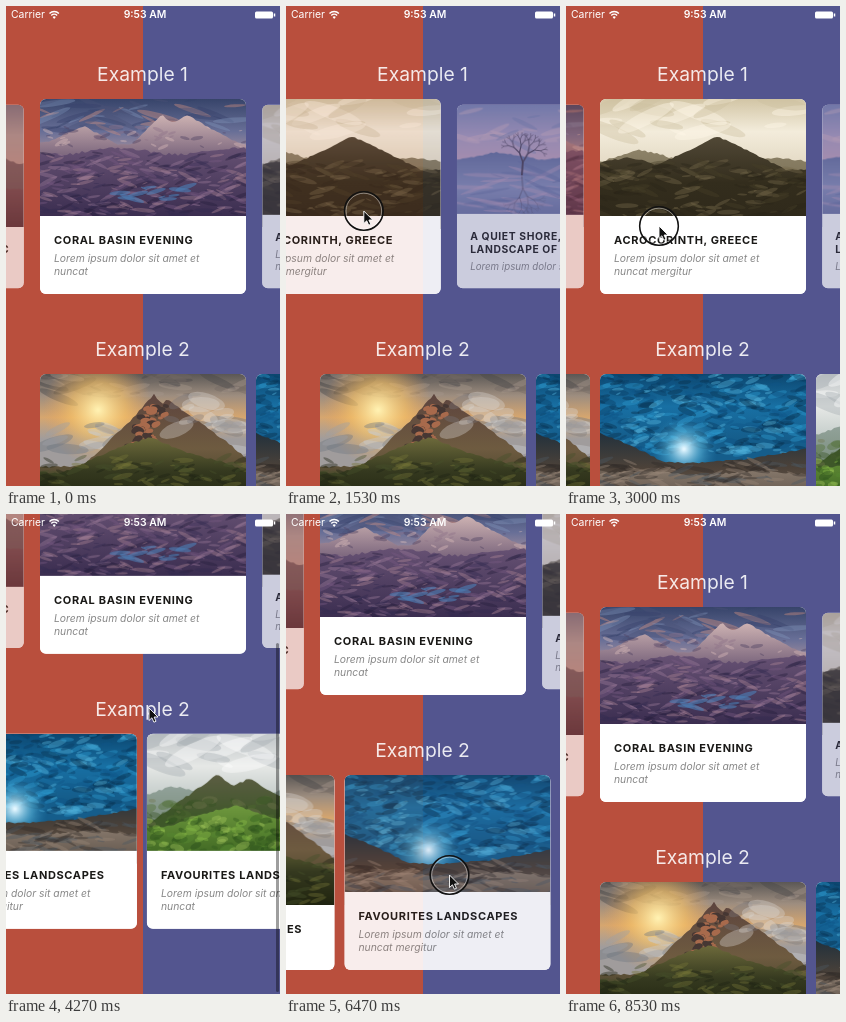
These frames come from a looping animation (274x480 px, 8590 ms). An HTML page with a canvas:

```html
<!DOCTYPE html>
<html lang="en">
<head>
<meta charset="utf-8">
<style>
html, body { margin: 0; width: 100%; height: 100%; overflow: hidden; }
body { font-family: Inter, Roboto, sans-serif; }
#stage { position: absolute; left: 0; top: 0; width: 274px; height: 480px; overflow: hidden; background: linear-gradient(90deg, #b94f3d 136.5px, #53558f 137.5px); }
#page { position: absolute; width: 274px; height: 587px; }
h2 { position: absolute; width: 273px; margin: 0; text-align: center; font-weight: 400; font-size: 19.3px; line-height: 24px; color: rgba(255,255,255,.88); }
.card { position: absolute; left: 34px; width: 206px; height: 195px; border-radius: 6px; overflow: hidden; background: #fff; }
.card canvas { position: absolute; left: 0; top: 0; }
.text { position: absolute; left: 0; right: 0; bottom: 0; padding: 17px 14px 16px; background: #fff; white-space: nowrap; }
.text b { display: block; font-size: 11px; line-height: 14px; letter-spacing: .64px; color: #1a1917; }
.text i { display: block; margin-top: 5px; font-size: 10.35px; line-height: 13px; color: #888; }
#bar { position: absolute; right: 1.5px; width: 2.5px; border-radius: 2px; background: rgba(0,0,0,.38); }
.status { position: absolute; top: 3px; color: #fff; font-size: 10.4px; line-height: 12px; white-space: nowrap; }
svg { position: absolute; left: 0; top: 0; overflow: visible; }
</style>
</head>
<body>
<div id="stage">
  <div id="page">
    <h2 style="top:56px">Example 1</h2>
    <h2 style="top:331px">Example 2</h2>
  </div>
  <div id="bar"></div>
  <div class="status" style="left:5px">Carrier</div>
  <div class="status" style="left:0;width:278px;text-align:center;font-weight:600">9:53 AM</div>
  <svg width="274" height="20" fill="none" stroke="#fff">
    <path d="M43.5 7.5a6.5 6.5 0 0 1 9.4 0M45.3 9.4a4 4 0 0 1 5.8 0" stroke-width="1.4"/>
    <path d="M46.6 11a2.2 2.2 0 0 1 3.2 0l-1.6 1.9z" fill="#fff" stroke="none"/>
    <rect x="249" y="5.5" width="18" height="7" rx="1.5" fill="#fff" stroke="none"/>
    <path d="M268.5 7.5v3" stroke-width="1.5"/>
  </svg>
  <svg id="cursor" width="1" height="1">
    <g id="ring" fill="none">
      <circle r="19.3" stroke="#111" stroke-width="1.6"/>
      <circle r="17.8" stroke="#fff" stroke-width=".8" opacity=".55"/>
    </g>
    <path d="M0 0V12.5L2.9 9.8 4.9 14.2 7 13.3 5.1 9H9Z" fill="#111" stroke="#fff" stroke-width=".9"/>
  </svg>
</div>
<script>
const $ = id => document.getElementById(id);
const W = 206, H = 130;

// Painting helpers
let seed, ctx;
const rnd = () => (seed = (seed * 16807) % 2147483647) / 2147483647;

function shade(gradient, colors) {
  colors.forEach((c, i) => gradient.addColorStop(i / (colors.length - 1), c));
  return gradient;
}
function sky(...colors) {
  ctx.fillStyle = shade(ctx.createLinearGradient(0, 0, 0, H / 2), colors);
  ctx.fillRect(0, 0, W, H);
}
function glow(x, y, r, ...colors) {
  ctx.fillStyle = shade(ctx.createRadialGradient(x, y, 1, x, y, r), colors);
  ctx.fillRect(0, 0, W, H);
}
// Ridge line above a base, with peaks given as [x, height, half width]
function ridge(base, rough, peaks, ...colors) {
  ctx.beginPath();
  ctx.moveTo(0, H);
  let top = base;
  for (let x = 0; x <= W + 3; x += 3) {
    const rise = Math.max(0, ...peaks.map(([px, h, w]) => h * (1 - Math.abs(x - px) / w)));
    const y = base - rise - rough * (Math.sin(x / 19 + base) + rnd());
    top = Math.min(top, y);
    ctx.lineTo(x, y);
  }
  ctx.lineTo(W, H);
  ctx.fillStyle = shade(ctx.createLinearGradient(0, top, 0, H), colors);
  ctx.fill();
}
// Random streaks between heights y0 and y1
function streaks(n, y0, y1, size, flat, ...colors) {
  ctx.globalAlpha = .4;
  for (let i = 0; i < n; i++) spot(rnd() * W, y0 + rnd() * (y1 - y0), size, flat, colors[i % colors.length]);
  ctx.globalAlpha = 1;
}
function spot(x, y, size, flat, color) {
  const r = size * (.3 + rnd());
  ctx.fillStyle = color;
  ctx.beginPath();
  ctx.ellipse(x, y, r, r * flat, rnd() - .5, 0, 7);
  ctx.fill();
}
function branch(x, y, len, angle, flip) {
  const nx = x + len * Math.cos(angle), ny = y + flip * len * Math.sin(angle);
  ctx.lineWidth = len / 7;
  ctx.beginPath();
  ctx.moveTo(x, y);
  ctx.lineTo(nx, ny);
  ctx.stroke();
  if (len > 4) for (const turn of [-.5, .45]) branch(nx, ny, len * .76, angle + turn + rnd() * .2, flip);
}

const paint = {
  city() {
    sky('#75798c', '#a9a0a2', '#b59c98');
    ridge(62, 4, [[70, 14, 60]], '#74656c', '#59474f');
    ridge(88, 3, [], '#6d4d58', '#4b2f3c');
  },
  canyon() {
    sky('#37446a', '#686f97', '#c39f9f');
    streaks(50, 0, 32, 18, .13, '#d4917f', '#35406a', '#7f93b8', '#4a5075');
    ridge(45, 1.5, [[44, 18, 34], [122, 27, 30], [148, 27, 54]], '#cdb2b2', '#5c4969', '#382c4a');
    streaks(45, 28, 50, 6, .3, '#8d7186', '#4a3f5f', '#dcbfbc');
    ridge(54, 3, [], '#665173', '#33274a');
    streaks(260, 54, 118, 9, .18, '#b08795', '#251e3d', '#785a82', '#322a50', '#9a7b98');
    ctx.globalAlpha = .6;
    for (let i = 0; i < 12; i++) spot(80 + i * 6, 94 + 6 * Math.sin(i), 10, .2, '#4c7eb5');
    ctx.globalAlpha = 1;
  },
  summit() {
    sky('#d2c5a5', '#f3ecdb', '#e4dac5');
    streaks(20, 0, 35, 24, .22, '#fff8e8', '#cbbd9e');
    ridge(62, 2, [[40, 8, 40]], '#8d8268', '#645a40');
    ridge(70, 1.5, [[116, 31, 70], [30, 10, 50]], '#514836', '#332d1d', '#2e281a');
    streaks(150, 64, 118, 11, .2, '#2a2518', '#75694b', '#453f29');
  },
  lake() {
    sky('#8088b5', '#b1a0c1', '#cba6bb');
    streaks(24, 5, 45, 22, .16, '#dfb9c4', '#7480ad');
    ridge(60, 1.5, [[40, 10, 45], [165, 14, 70]], '#626c9b', '#8990b9', '#626a9b');
    streaks(40, 70, 117, 25, .07, '#c5a2bd', '#626b9d');
    ctx.strokeStyle = '#493d51';
    branch(69, 75, 14, -1.5, 1);
    ctx.globalAlpha = .35;
    branch(69, 76, 13, -1.5, -1);
    ctx.globalAlpha = 1;
  },
  mist() {
    sky('#9a9fa8', '#cbb7a3', '#746a5a');
    ridge(65, 4, [[50, 20, 40], [160, 22, 50]], '#5f6257', '#343a2d');
  },
  peak() {
    sky('#5b5755', '#9d8d7f', '#d6a66f', '#a09c9c');
    streaks(45, 0, 24, 18, .2, '#454446', '#a6978b', '#706863');
    glow(58, 36, 55, '#fff0b0', 'rgba(250,195,100,.6)', 'rgba(235,160,80,0)');
    streaks(30, 48, 78, 18, .25, '#c9cbd0', '#6f7680', '#9d9fa5');
    ridge(92, 2, [[114, 72, 58], [128, 68, 85], [96, 48, 50]], '#5d443e', '#6e5b40', '#353822');
    for (let i = 0; i < 60; i++) spot(104 - i / 3 + rnd() * 25, 32 + i * .8, 5, .6, i % 2 ? '#a86a4c' : '#463733');
    ctx.globalAlpha = .35;
    for (let i = 0; i < 16; i++) spot(130 + rnd() * 70, 25 + rnd() * 32, 15, .4, i % 3 ? '#dad8d4' : '#77767a');
    ctx.globalAlpha = 1;
    ridge(98, 2, [[112, 34, 90]], '#6d6a3b', '#35391f', '#20240f');
    streaks(110, 84, 128, 9, .25, '#1f2413', '#747238', '#47502a');
  },
  cave() {
    sky('#0c466f', '#1870a4', '#155d8b');
    streaks(420, 0, 80, 8, .3, '#082c49', '#2e9cd0', '#0e5587', '#58b9e2', '#0a3d62');
    glow(84, 75, 34, '#e2f6ff', 'rgba(100,195,232,.5)', 'rgba(40,130,180,0)');
    ridge(88, 1.5, [[0, 28, 62], [206, 14, 60]], '#22313c', '#4d4239', '#75685c');
    ridge(100, 2, [], '#85776a', '#5d5148');
    streaks(120, 88, 122, 11, .17, '#302a27', '#988777', '#4c5762');
  },
  green() {
    sky('#c0c5c8', '#e6e8e6', '#c2cbc8');
    streaks(18, 0, 32, 24, .25, '#fff', '#a3aaae');
    ridge(62, 2, [[25, 8, 30], [160, 8, 60]], '#92a29a', '#657a61');
    ridge(86, 2, [[71, 42, 66], [103, 41, 78]], '#5c5d43', '#3e5729', '#3e5729');
    streaks(60, 66, 90, 7, .5, '#4d6b30', '#71764d', '#385224');
    ridge(92, 2, [[90, 18, 70], [206, 18, 60]], '#6f993e', '#38601f');
    streaks(230, 84, 125, 6, .5, '#8dbd48', '#264818', '#578a31', '#a4c85c', '#33591f');
  }
};

const LOREM = 'Lorem ipsum dolor sit amet', TWO = LOREM + ' et<br>nuncat', THREE = TWO + ' mergitur';
const FAV = 'FAVOURITES LANDSCAPES';
function makeRow(top, first, list) {
  return list.map(([pic, title, sub], k) => {
    const el = document.createElement('div');
    el.className = 'card';
    el.style.top = top + 'px';
    el.innerHTML = `<canvas width="${W}" height="${H}"></canvas><div class="text"><b>${title}</b><i>${sub}</i></div>`;
    $('page').append(el);
    ctx = el.firstChild.getContext('2d');
    seed = 4321 + k * 77;
    paint[pic]();
    return { el, i: k + first };
  });
}
const rows = [
  makeRow(93, -1, [
    ['city', 'EARLIER THIS MORNING, NYC', LOREM],
    ['canyon', 'CORAL BASIN EVENING', TWO],
    ['summit', 'ACROCORINTH, GREECE', THREE],
    ['lake', 'A QUIET SHORE, MAJESTIC<br>LANDSCAPE OF NEW ZEALAND', LOREM],
    ['mist', 'MISTY RIDGE, GERMANY', LOREM]
  ]),
  makeRow(368, 0, [['peak', FAV, LOREM], ['cave', FAV, THREE], ['green', FAV, TWO], ['mist', FAV, LOREM]])
];

// Gestures: the finger drags by (dx, dy), then the content settles
const LOOP = 8590, PITCH = 216, DRAG = 92.5, RANGE = 107, OVER = 46, PRESS = 100;
const swipe = (t, row, dir, x, y) => ({ t, row, dir, x, y, dx: -dir * DRAG, dy: 0, hold: 400 });
const flick = (t, dir, x, y) => ({ t, dir, x, y, dx: 0, dy: dir * 196, hold: 250 });
const gestures = [
  swipe(300, 0, 1, 185, 208),
  swipe(1200, 0, 1, 163, 205),
  swipe(2100, 0, -1, 95, 215),
  swipe(3040, 0, -1, 93, 220),
  flick(3738, -1, 143, 390),
  swipe(4900, 1, -1, 130, 355),
  swipe(6336, 1, -1, 139, 361),
  flick(7220, 1, 150, 150)
];
const enter = { t: 0, x: 290, y: 230, dx: 0, dy: 0, hold: 0 };
const leave = { t: 7740, x: 300, y: 330, dx: 0, dy: 0, hold: 0 };
const flicks = gestures.filter(g => g.dy);

const ease = u => (u = Math.min(1, Math.max(0, u)), u * u * (3 - 2 * u));
const sum = (list, fn) => list.reduce((total, item) => total + fn(item), 0);
const settle = (g, t) => ease((t - g.t - g.hold) / 350);
const dragged = (g, t) => ease((t - g.t) / g.hold);

function drawRow(row, t) {
  const own = gestures.filter(g => g.row === row), part = DRAG / PITCH;
  let pos = sum(own, g => g.dir * (part * dragged(g, t) + (1 - part) * settle(g, t)));
  if (row) pos += sum([1620, 4120], auto => ease((t - auto) / 300));
  const active = sum(own, g => g.dir * settle(g, t));
  const held = own.find(g => t > g.t && t < g.t + g.hold);
  const dim = held ? .1 * ease((t - held.t) / 100) : 0;
  for (const { el, i } of rows[row]) {
    const focus = row ? 1 : Math.max(0, 1 - Math.abs(active - i));
    const touched = held && Math.abs(pos - i) < .5;
    el.style.transform = `translateX(${(i - pos) * PITCH}px) scale(${.94 + .06 * focus})`;
    el.style.opacity = .7 + .3 * focus - (touched ? dim : 0);
  }
}

function drawScroll(t) {
  const y = sum(flicks, g => g.dir * ((RANGE + OVER) * ease((t - g.t) / 420) - OVER * ease((t - g.t - 420) / 560)));
  const len = 390 - Math.max(0, y, -RANGE - y), part = Math.min(1, Math.max(0, -y / RANGE));
  const bar = $('bar').style;
  $('page').style.transform = `translateY(${y}px)`;
  bar.height = len + 'px';
  bar.top = 2 + part * (476 - len) + 'px';
  bar.opacity = sum(flicks, g => ease((t - g.t) / 100) - ease((t - g.t - 980) / 250));
}

function drawCursor(t) {
  const path = [enter, ...gestures, leave];
  const n = path.findLastIndex(g => t >= g.t - PRESS), g = path[n], next = path[n + 1];
  $('cursor').style.display = next ? '' : 'none';
  if (!next) return;
  const end = g.t + g.hold, arrive = next.t - PRESS, k = dragged(g, t + .001);
  const glide = ease(1 - (arrive - t) / Math.min(350, arrive - end));
  const x = g.x + g.dx * k, y = g.y + g.dy * k;
  $('cursor').style.transform = `translate(${x + (next.x - x) * glide}px,${y + (next.y - y) * glide}px)`;
  $('ring').style.display = g !== enter && t < end ? '' : 'none';
}

const start = performance.now();
function frame() {
  const t = (performance.now() - start) % LOOP;
  drawRow(0, t);
  drawRow(1, t);
  drawScroll(t);
  drawCursor(t);
  requestAnimationFrame(frame);
}
frame();
</script>
</body>
</html>
```
